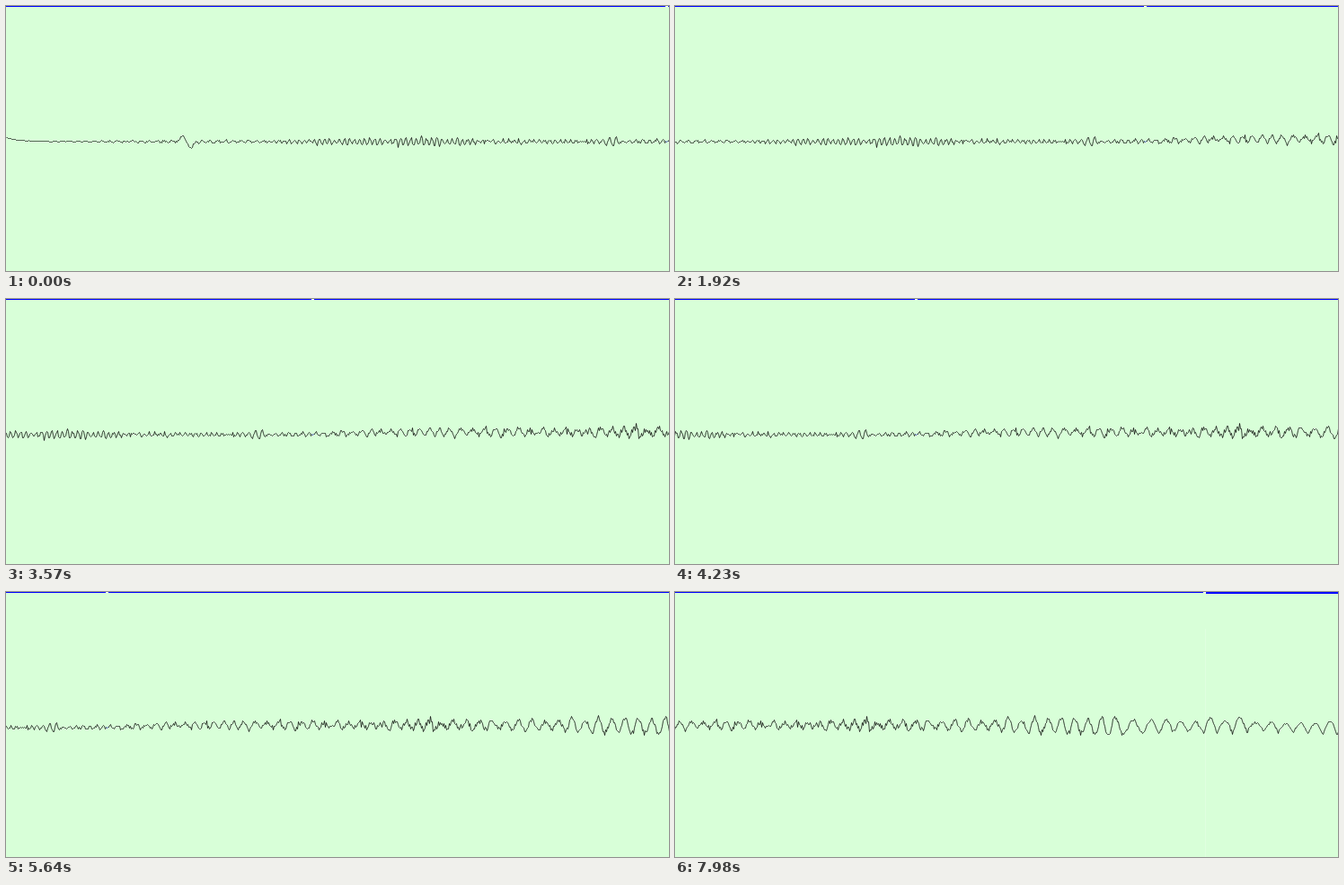
These frames come from a looping animation (738x295 px, 8000 ms). An HTML page:

```html
<!DOCTYPE html>
<html lang="en">
<head>
<meta charset="utf-8">
<title>Scrolling waveform</title>
<style>
  html, body { margin: 0; width: 100%; height: 100%; overflow: hidden; background: #d8ffd8; }
  svg { display: block; width: 738px; height: 295px; }
</style>
</head>
<body>
<svg viewBox="0 0 738 295">
  <rect width="738" height="295" fill="#d8ffd8"/>
  <g id="tape">
    <rect width="1640" height="1" fill="#00f"/>
    <rect x="734" width="3" height="1" fill="#fff"/>
    <rect x="1470" width="3" height="1" fill="#fff"/>
    <rect x="1473" width="167" height="2" fill="#00f"/>
    <rect x="1472" y="41" width="1" height="254" fill="#e0ffe0"/>
    <path id="wave" fill="none" stroke="#000" stroke-width=".75"/>
    <path id="mark" fill="none" stroke="#5a6cf0"/>
  </g>
</svg>
<script>
const LOOP = 8000, STEP = 30, PX_PER_STEP = 3.314, END = 1625;
const tape = document.getElementById('tape');

// Key points: x, cycles so far, amplitude, roughness
const keys = [
  [0, 0, 0, .2], [150, 17, .8, .9], [287, 33, 1.5, 1.1], [410, 55, 3.6, 1.5],
  [485, 68, 3.6, 1.5], [530, 76, 1.5, 1.5], [660, 98.5, 1.4, 1.3], [746, 110, 2, 1.6],
  [887, 123, 4, 2], [1120, 141, 3.6, 3.4], [1193, 146, 5, 2.5], [1371, 158, 9, 2.2],
  [1412, 160, 8, 1.2], [1510, 166, 8, 1.8], [1545, 168, 4, 1.2], [1627, 173, 9, .3]
];

function ease(a, b, x) {
  const k = Math.min(1, Math.max(0, (x - a) / (b - a)));
  return k * k * (3 - 2 * k);
}

const bump = (x, center, width) => Math.exp(-(((x - center) / width) ** 2));

function noise(n) {
  const v = Math.sin(n * 127.1 + 11.7) * 43758.5453;
  return (v - Math.floor(v)) * 2 - 1;
}

function keyed(x) {
  const i = keys.findIndex(k => k[0] > x), a = keys[i - 1], b = keys[i];
  const k = (x - a[0]) / (b[0] - a[0]);
  return a.slice(1).map((v, j) => v + (b[j + 1] - v) * k);
}

function height(x) {
  const [cycles, amp, rough] = keyed(x);
  const mid = 150.5 - 3 * ease(700, 860, x) + 1.5 * ease(1193, 1371, x) + 3 * ease(1500, 1600, x);
  const settle = -4.5 * Math.exp(-x / 14);
  const blip = 7 * bump(x, 204, 5) - 8 * bump(x, 197, 4);
  const burst = 4 * bump(x, 674, 8);

  // Sine waves turn into arches with sharp troughs
  const sine = Math.cos(2 * Math.PI * cycles);
  const arch = 2 * Math.abs(Math.cos(Math.PI * cycles)) - 1;
  const wave = sine + (arch - sine) * ease(1380, 1560, x);

  const swell = 1 + .35 * noise(Math.round(cycles) + 300);
  const spike = Math.abs(noise(x + 900)) > .94 ? 2 : 1;
  return mid + settle + blip - (amp * swell + burst) * wave + noise(x) * rough * spike;
}

const ys = Array.from({ length: END }, (_, x) => Math.round(height(x)));
const line = (from, to) =>
  'M' + ys.slice(from, to).map((y, i) => `${from + i + .5} ${y + .5}`).join('L');
document.getElementById('wave').setAttribute('d', line(0, END));
document.getElementById('mark').setAttribute('d', line(734, 737));

function draw(t) {
  const step = Math.floor((t % LOOP) / STEP);
  tape.setAttribute('transform', `translate(${-Math.round(step * PX_PER_STEP)} 0)`);
}

function tick() {
  draw(performance.now());
  requestAnimationFrame(tick);
}
tick();
</script>
</body>
</html>
```
